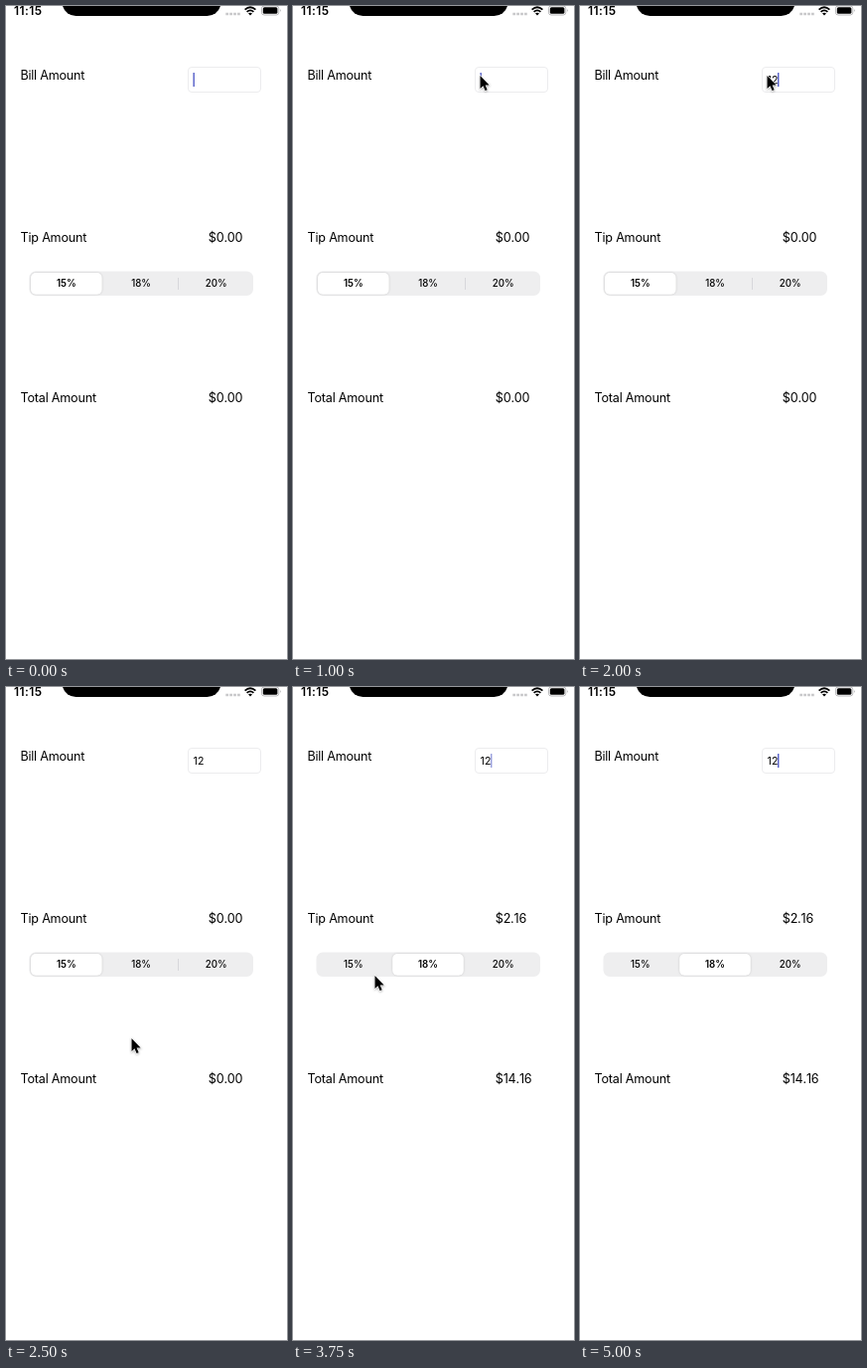
An HTML page that plays this animation: 283 by 656 pixels, repeating every 5500 ms.

```html
<!DOCTYPE html>
<html lang="en">
<head>
<meta charset="utf-8">
<title>Tip calculator</title>
<style>
  html, body { margin: 0; width: 100%; height: 100%; overflow: hidden; background: #fff; }
  svg { display: block; width: 283px; height: 656px; font-family: Inter, Roboto, sans-serif; }
  .label { font-size: 12.6px; letter-spacing: -.22px; }
  .amount, .input, .clock { font-kerning: none; }
  .clock { font-size: 12px; font-weight: 600; letter-spacing: .4px; }
  .input { font-size: 10.6px; }
  .segment { font-size: 9.7px; font-weight: 500; text-anchor: middle; }
  .segment .on { font-weight: 600; }
  .menu { font-size: 10.3px; text-anchor: middle; fill: #fff; }
  #thumb { filter: drop-shadow(0 .6px 1px rgba(0, 0, 0, .16)); }
  #pointer { filter: drop-shadow(0 1px 1px rgba(0, 0, 0, .3)); }
</style>
</head>
<body>
<svg viewBox="0 0 283 656">
  <!-- status bar -->
  <text class="clock" x="8" y="9.3">11:15</text>
  <path d="M57 0A14 14 0 0 0 70.4 10H202.6A14 14 0 0 0 216 0Z"/>
  <path d="M221.3 8H236" stroke="#c9c9cb" stroke-width="2.6" stroke-dasharray="2.8 1.1"/>
  <g fill="none" stroke="#000" stroke-width="1.8">
    <path d="M240.6 3.6Q246 -1.2 251.4 3.6"/>
    <path d="M242.6 5.9Q246 2.9 249.4 5.9"/>
  </g>
  <path d="M244 7.4Q246 5.9 248 7.4L246 9.5Z"/>
  <rect x="257.4" y="0" width="17.4" height="9" rx="2.6" fill="none" stroke="#a8a8aa" stroke-width=".8"/>
  <rect x="258.8" y="1.2" width="14.6" height="6.6" rx="1.5"/>
  <path d="M276 3Q277.6 4.5 276 6Z" fill="#a8a8aa"/>

  <!-- form -->
  <g class="label">
    <text x="14.4" y="73.8">Bill Amount</text>
    <text x="14.6" y="237.2">Tip Amount</text>
    <text x="14.6" y="398.2">Total Amount</text>
    <text class="amount" id="tip" x="203.8" y="237.2"></text>
    <text class="amount" id="total" x="203.8" y="398.2"></text>
  </g>
  <rect x="183.5" y="61.5" width="73" height="25" rx="3.5" fill="#fff" stroke="#ececee"/>
  <text class="input" id="bill" x="188.6" y="78"></text>
  <rect id="caret" y="67" width="1.3" height="14" fill="#4650c4"/>

  <rect x="23.5" y="266.5" width="225.5" height="24.5" rx="6.5" fill="#eeeeef"/>
  <path id="divider" d="M173.5 273V285" stroke="#d4d4d8" stroke-width=".9"/>
  <rect id="thumb" y="268" width="71.6" height="21.8" rx="5" fill="#fff"/>
  <g class="segment">
    <text x="60.8" y="282.3">15%</text>
    <text x="136" y="282.3">18%</text>
    <text x="211.6" y="282.3">20%</text>
  </g>

  <!-- edit menu -->
  <g id="menu">
    <rect x="162.8" y="25.3" width="52.9" height="28" rx="5"/>
    <path d="M181.5 53L189 60.3L196.5 53Z"/>
    <text class="menu" x="189" y="43">Paste</text>
  </g>

  <path id="pointer" d="M0 0V14.5L3.3 11.4L5.6 16.8L8 15.8L5.7 10.5H10.2Z"
        stroke="#fff" stroke-width="1.2" paint-order="stroke"/>
</svg>
<script>
const LOOP = 5500, STEP = 250;
const $ = id => document.getElementById(id);
const segments = document.querySelectorAll('.segment text');

// Stops of the pointer: time in ms, x, y.
const stops = [
  [250, 207, 24], [750, 188, 70], [2000, 188, 70], [2500, 126, 353], [2750, 129, 277],
  [3000, 152, 276], [3250, 152, 276], [3750, 82, 290], [4000, 134, 322]
];

const clamp = value => Math.min(1, Math.max(0, value));
const mix = (a, b, p) => a + (b - a) * p;
const easeOut = (time, from, to, power) => 1 - (1 - clamp((time - from) / (to - from))) ** power;
const money = value => '$' + value.toFixed(2);

function pointerAt(time) {
  const next = stops.findIndex(([at]) => at > time);
  if (next < 1) return stops.at(-1).slice(1);
  const [from, x, y] = stops[next - 1], [to, x2, y2] = stops[next];
  const p = easeOut(time, from, to, 1.8);
  return [mix(x, x2, p), mix(y, y2, p)];
}

// Half a second on, a quarter off, then a quarter coming back.
function blink(time) {
  const phase = time % 1000;
  return phase < 500 ? 1 : phase < 750 ? 0 : .6;
}

function caretAt(time) {
  if (time < 750) return blink(time + 250);
  return time < 2000 ? 1 : blink(time);
}

function draw(time) {
  const bill = '12'.slice(0, clamp((time - 1500) / 500) * 2);
  const picked = time > 3000;
  const tip = picked ? bill * .18 : 0;

  $('bill').textContent = bill;
  $('tip').textContent = money(tip);
  $('total').textContent = money(picked ? +bill + tip : 0);

  $('caret').setAttribute('x', 188.5 + 5.3 * bill.length);
  $('caret').setAttribute('opacity', caretAt(time));
  $('menu').setAttribute('opacity', clamp(1 - Math.abs(time - 1500) / 500));

  $('thumb').setAttribute('x', mix(25, 100.2, easeOut(time, 3000, 3500, 4.5)));
  $('divider').setAttribute('opacity', picked ? 0 : 1);
  segments.forEach((text, i) => text.classList.toggle('on', i === +picked));

  const [x, y] = pointerAt(time);
  $('pointer').setAttribute('visibility', time >= 250 && time < 4250 ? 'visible' : 'hidden');
  $('pointer').setAttribute('transform', `translate(${x + .5} ${y}) scale(.9)`);
}

const start = performance.now();
let shown = -1;
function tick() {
  const step = Math.floor((performance.now() - start) % LOOP / STEP);
  if (step !== shown) draw((shown = step) * STEP);
  requestAnimationFrame(tick);
}
tick();
</script>
</body>
</html>
```
